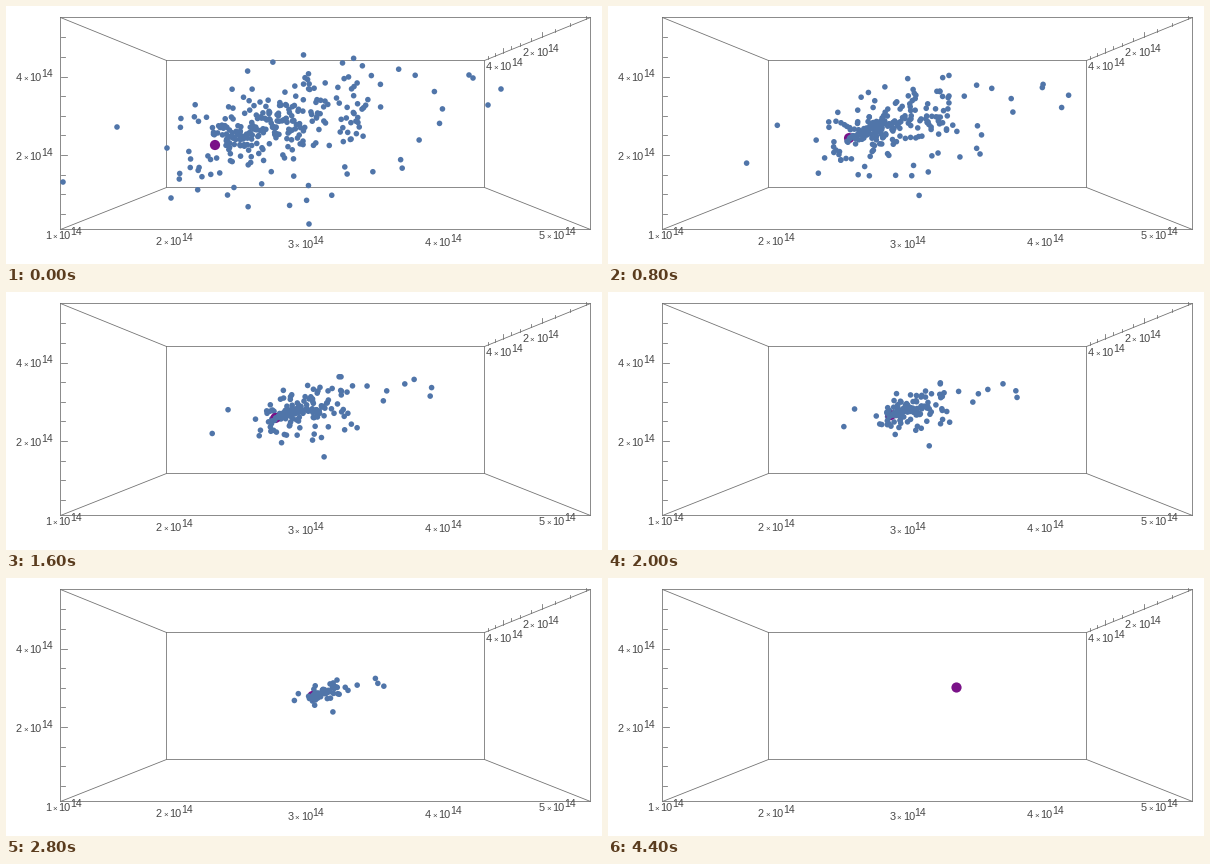
Write a matplotlib script that moves like this. It is 596 by 258 pixels and loops after 4.5 s.

```python
import numpy as np
import matplotlib.pyplot as plt
from matplotlib.animation import FuncAnimation

W, H, DPI = 596, 258, 100
FRAMES, STEP = 45, 100
PX = 72 / DPI
BLUE, PURPLE, GREY, INK = "#5075a9", "#7a1288", "#707070", "#484848"

fig = plt.figure(figsize=(W / DPI, H / DPI), dpi=DPI, facecolor="white")
ax = fig.add_axes([0, 0, 1, 1])
ax.set_xlim(0, W)
ax.set_ylim(H, 0)
ax.axis("off")


def line(xs, ys):
    ax.plot(xs, ys, color=GREY, lw=0.8 * PX, zorder=1)


def label(digit, x, base):
    """Draw digit x 10^14 with its left end at x on the given baseline."""
    parts = [(digit, 0, 0, 11), ("×", 7, 0, 8), ("10", 13.6, 0, 11), ("14", 25, -4, 10.5)]
    for text, dx, dy, size in parts:
        ax.text(x + dx, base + dy, text, size=size * PX, family="Liberation Sans",
                color=INK, va="baseline", ha="left")


def draw_box():
    front, back = (54, 11, 584, 223), (160, 54, 478, 181)
    for x0, y0, x1, y1 in (front, back):
        line([x0, x1, x1, x0, x0], [y0, y0, y1, y1, y0])
    for i in (0, 2):
        for j in (1, 3):
            line([front[i] + 0.5, back[i] + 0.5], [front[j] + 0.5, back[j] + 0.5])

    for k in range(10):
        y = 31.4 + 19.6 * k
        line([54.5, 61 if k in (2, 6) else 58.5], [y, y])
    # Ticks along the receding top right edge
    for v in np.arange(0.5, 5.5, 0.5):
        depth = 0.733 + (v - 2) * 0.0825
        x, y = 319.5 + 159 / depth, 117.5 - 63.5 / depth
        line([x, x], [y, y - (5 if v in (2, 4) else 3)])

    for digit, x, base in [("4", 10, 75), ("2", 10, 153.5), ("1", 39, 233),
                           ("2", 150, 239), ("3", 281.5, 241.5), ("4", 419, 240),
                           ("5", 533, 233), ("4", 480, 64), ("2", 516.5, 50)]:
        label(digit, x, base)


# Each stone is (screen x, screen y, time of impact, depth)
FAR = [
    (57, 176, 34, .885), (111, 121, 33.5, 1.04), (495, 83, 37, 1.355),
    (482, 99, 38.6, 1.44), (463, 69, 39, 1.21), (467, 72, 32, 1.5),
    (303, 218, 38, .94), (165, 192, 24.5, 1.1),
]

ROCK_START = np.array([209, 139, 1.0])
ROCK_END = 1.355 * np.array([347.5, 109.2, 1.0])


def halo(count, rng):
    """Loose slanted ring around the cloud."""
    stones = []
    for angle in np.linspace(0, 2 * np.pi, count, endpoint=False):
        angle += rng.normal(0, 0.1)
        size = rng.uniform(0.85, 1.1)
        dx = 127 * size * np.cos(angle)
        dy = 74 * size * np.sin(angle) - 0.14 * dx
        stones.append((300 + dx, 122 + dy, rng.uniform(20, 39), 1 + rng.normal(0, 0.03)))
    return stones


def core(count, rng):
    """Dense cloud beside the rock, leaning up to the right."""
    stones = []
    while len(stones) < count:
        hit = 39 * (1 - rng.random() ** (1 / 1.4))
        spread = np.sqrt(hit)
        dx = spread * rng.normal(16, 11)
        dy = -0.28 * dx + spread * rng.normal(0, 5.2)
        x, y = 209 + dx, 139 + dy
        if hit > 0.5 and 173 < x < 375 and 62 < y < 188 and np.hypot(dx, dy) > 10:
            stones.append((x, y, hit, 1 + rng.normal(0, 0.05)))
    return stones


rng = np.random.default_rng(7)
stones = np.array(FAR + halo(28, rng) + core(262, rng))
hits = stones[:, 2]
# Homogeneous coordinates, so straight paths in space stay linear in time
starts = np.column_stack([stones[:, 0], stones[:, 1], np.ones(len(stones))]) * stones[:, 3:]

draw_box()
dots = ax.scatter([], [], linewidths=0, zorder=3)


def update(n):
    rock = ROCK_START + (ROCK_END - ROCK_START) * n / (FRAMES - 1)
    live = hits > n
    left = (1 - n / hits[live])[:, None]
    pos = np.vstack([rock + (starts[live] - ROCK_START) * left, rock])
    is_rock = np.arange(len(pos)) == len(pos) - 1

    # Farthest first, so near stones cover the rock
    order = np.argsort(-pos[:, 2], kind="stable")
    pos, is_rock = pos[order], is_rock[order]
    dots.set_offsets(pos[:, :2] / pos[:, 2:])
    dots.set_sizes((np.where(is_rock, 10.2, 5.6) * PX) ** 2)
    dots.set_facecolors(np.where(is_rock, PURPLE, BLUE))
    return [dots]


anim = FuncAnimation(fig, update, frames=FRAMES, interval=STEP,
                     init_func=lambda: update(0), repeat=True, repeat_delay=0)
plt.show()
```
